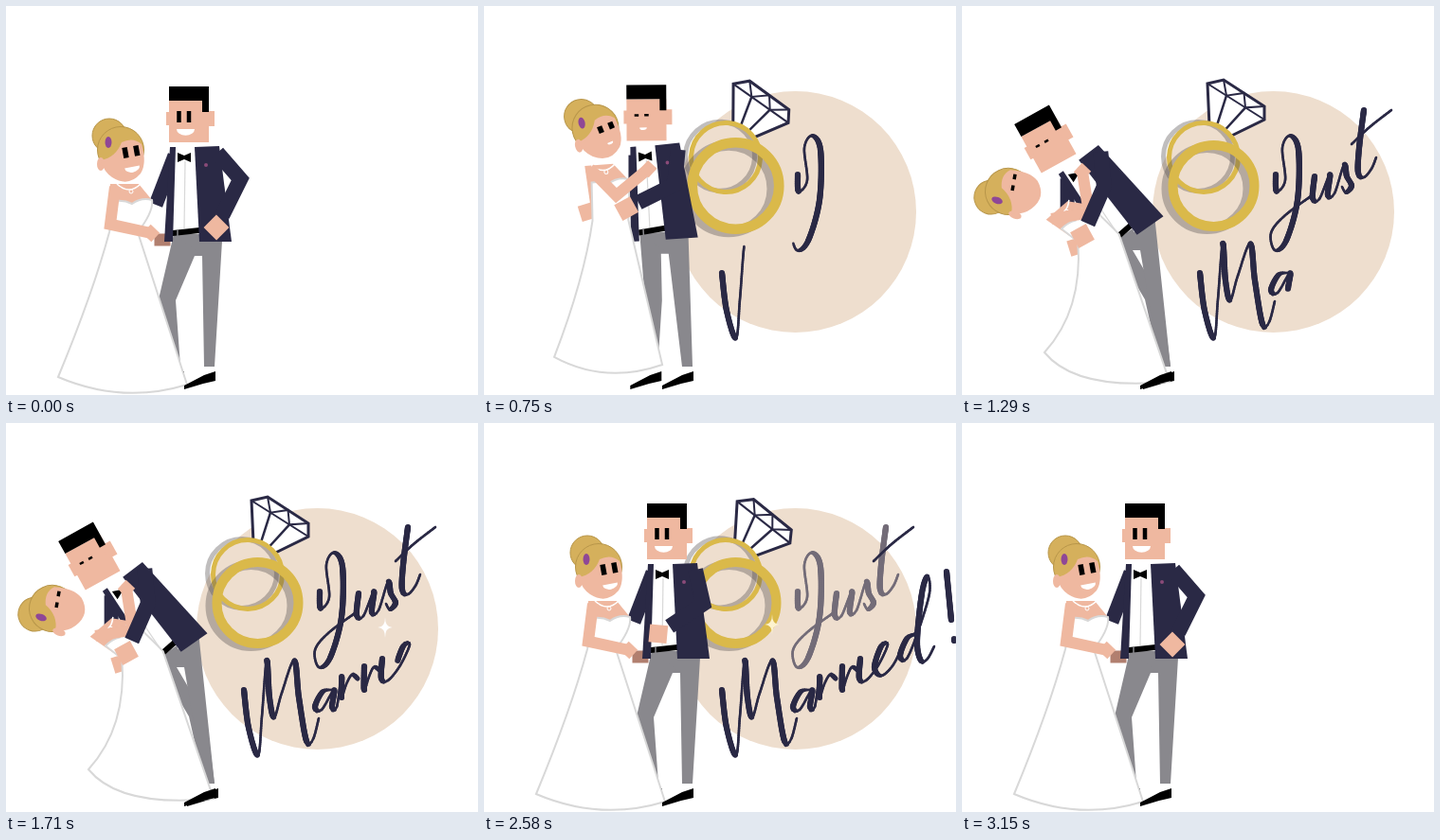
These frames come from a looping animation (498x411 px, 3210 ms). An HTML page with a canvas:

```html
<!DOCTYPE html>
<html lang="en">
<head>
<meta charset="utf-8">
<title>Just Married!</title>
<style>
html, body { margin: 0; width: 100%; height: 100%; overflow: hidden; background: #fff; }
canvas { display: block; }
</style>
</head>
<body>
<canvas id="stage" width="498" height="411"></canvas>
<script>
const c = document.getElementById('stage').getContext('2d');
const SKIN = '#efb8a0', NAVY = '#2a2945', GREY = '#89888d', HAIR = '#d5b05c', CURL = '#b8964a';
const GOLD = '#dab94a', EDGE = '#d8d8d8', CREAM = '#eedece';
const LOOP = 3210, STEP = 30;

// Timing and vectors
const clamp = x => Math.max(0, Math.min(1, x));
const span = (t, a, b) => clamp((t - a) / (b - a));
const ease = (t, a, b) => { const p = span(t, a, b); return p * p * (3 - 2 * p); };
const backOut = p => p ? 1 + 2.70158 * (p - 1) ** 3 + 1.70158 * (p - 1) ** 2 : 0;
const mix = (a, b, p) => a + (b - a) * p;
const mixAll = (a, b, p) => a.map((v, i) => mix(v, b[i], p));
const rad = deg => deg * Math.PI / 180;
const shift = ([x, y], dx, dy) => [x + dx, y + dy];

// Maps local points into a frame at (x, y) turned by angle
const frameAt = ([x, y], a) => (px, py) =>
  [x + px * Math.cos(a) - py * Math.sin(a), y + px * Math.sin(a) + py * Math.cos(a)];

// Elbow of a two-part arm; side picks the way it bends
function elbow([x, y], [hx, hy], upper, fore, side) {
  const d = Math.min(Math.hypot(hx - x, hy - y), upper + fore);
  const bend = Math.acos(Math.max(-1, Math.min(1, (upper ** 2 + d ** 2 - fore ** 2) / (2 * upper * d))));
  const a = Math.atan2(hy - y, hx - x) + side * bend;
  return [x + upper * Math.cos(a), y + upper * Math.sin(a)];
}

// The dance: hug brings them close, lift raises the bride, dip leans both over
function danceAt(t) {
  const rise = ease(t, 150, 510);
  const dip = span(t, 510, 1250) ** 2 * (1 - ease(t, 1740, 2400));
  const hug = rise * (1 - ease(t, 2220, 2580));
  const fall = dip ** 1.5;
  return {
    dip, hug, fall,
    lift: rise * (1 - ease(t, 950, 1230)),
    reach: rise * (1 - ease(t, 2200, 3000)),
    groomBlink: ease(t, 330, 690) * (1 - ease(t, 1800, 2200)),
    brideBlink: ease(t, 600, 900) * (1 - ease(t, 1900, 2500)),
    smile: 1 - span(t, 600, 850) + span(t, 1800, 2100),
    blend: (stand, hold, dipped, near = hug) => mixAll(mixAll(stand, hold, near), dipped, fall)
  };
}

// Drawing helpers
function trace(points) {
  c.beginPath();
  for (const p of points) c.lineTo(...p);
}
function poly(points, color) {
  trace(points);
  c.fillStyle = color;
  c.fill();
}
function line(points, color, width) {
  trace(points);
  c.strokeStyle = color;
  c.lineWidth = width;
  c.stroke();
}
function oval(x, y, rx, ry, color, edge) {
  c.beginPath();
  c.ellipse(x, y, rx, ry, 0, 0, 7);
  c.fillStyle = color;
  c.fill();
  if (edge) { c.strokeStyle = edge; c.lineWidth = 1; c.stroke(); }
}
function box(x, y, w, h, color) {
  c.fillStyle = color;
  c.fillRect(x - w / 2, y - h / 2, w, h);
}
function placed([x, y], angle, scale, draw) {
  c.save();
  c.translate(x, y);
  c.rotate(angle);
  c.scale(scale, scale);
  draw();
  c.restore();
}
function smile(x, y, r, tilt) {
  c.beginPath();
  c.ellipse(x, y, r, r * .72, tilt, 0, Math.PI);
  c.fillStyle = '#fff';
  c.fill();
}
const hand = (at, angle, w, h = w, color = SKIN) => placed(at, angle, 1, () => box(0, 0, w, h, color));
const shoe = x => poly([[x - 16, 401], [x + 5, 390], [x + 17, 386], [x + 17, 396], [x + 4, 399], [x - 16, 405]], '#000');

function groomRig(s) {
  const hip = s.blend([202, 249], [190, 247], [183, 243]), lean = rad(-35 * s.dip);
  return { hip, lean, torso: frameAt(hip, lean) };
}

function drawGroom(s) {
  const { hip, lean, torso } = groomRig(s);
  const shoulder = torso(-24, -91);
  line([shoulder, shift(shoulder, -20 + 20 * s.hug, 52)], NAVY, 15);
  const backHand = s.blend([165, 247], [109, 216], [121, 254]);
  if (s.hug < .3) hand(backHand, 0, 17, 13, '#b17f6f');
  else hand(backHand, -.3, 17);

  // Legs: the left one tucks behind the right in the dip
  const crotch = shift(hip, 5, 15), waist = torso(-25, -8);
  const [knee, foot] = s.blend([170, 178], [178, 176], [202, 214]);
  shoe(foot - 7);
  poly([waist, torso(2, -8), crotch, shift(crotch, -8, 0), [knee + 9, 311], [foot + 6, 381], [foot - 5, 381], [knee - 9, 310]], GREY);
  poly([waist, torso(26, -1), [220, 381], [209, 381], crotch], GREY);

  placed(hip, lean, 1, () => {
    poly([[-24, -100], [-1, -100], [2, -13], [-26, -10]], '#fff');
    line([[-13, -85], [-14, -14]], EDGE, 1.2);
    poly([[-26, -12], [2, -15], [2, -9], [-26, -6]], '#000');
    line([[-21, -13], [-21, -6]], GREY, 1.5);
    poly([[-29, -100], [-23, -100], [-26, 0], [-35, 0]], NAVY);
    poly([[-3, -100], [23, -101], [36, 0], [2, 0]], NAVY);
    poly([[-21, -94], [-14, -91], [-7, -94], [-7, -84], [-14, -87], [-21, -84]], '#000');
    oval(9, -81, 2, 2, '#8a4a78');
  });

  placed(torso(-9 - 11 * s.dip, -127 - 4 * s.dip), rad(-29 * s.dip ** 2), 1, () => {
    const eye = mix(12, 2.5, s.groomBlink);
    box(0, 0, 42, 44, SKIN);
    box(-21, -3, 6, 14, SKIN);
    box(22, -3, 10, 16, SKIN);
    poly([[-21, -37], [21, -37], [21, -10], [14, -10], [14, -22], [-21, -22]], '#000');
    for (const x of [-10.5, 0]) box(x, -5, 4.5, eye, '#000');
    smile(-3.5, 8, 9.5 * s.smile, 0);
  });
}

function drawFrontArm(s) {
  const shoulder = groomRig(s).torso(21, -94);
  const end = s.blend([222, 234], [151, 213], [127, 243], s.reach);
  const joint = elbow(shoulder, end, 37, 57, -1);
  line([shoulder, joint, mixAll(joint, end, .75)], NAVY, 16);
  hand(end, mix(.78, -.5, s.reach), 19);
}

function drawBride(s) {
  const lean = rad(-41 * s.dip), swing = 16 * Math.sin(Math.PI * s.dip);
  const neck = shift(s.blend([125, 188], [122, 189], [100, 216]), 0, -22 * s.lift);
  const chest = frameAt(neck, lean);
  const waist = frameAt(shift(s.blend([124, 239], [133, 239], [144, 245]), 0, -13 * s.lift), lean / 4);
  const half = 15 + 3.5 * s.hug + 3.5 * s.dip;
  const waistL = waist(-half, 0), waistR = waist(half, 0);
  const hemL = shift(s.blend([55, 392], [79, 393], [87, 366]), -swing, -16 * s.lift - swing);
  const hemR = shift(s.blend([191, 400], [187, 397], [219, 397]), 0, -18 * s.lift);
  const bustL = chest(-9, 18), dent = chest(8, 21), bustR = chest(29, 17);

  poly([chest(-15, 0), chest(15, 0), bustR, waistR, waistL], SKIN);
  c.beginPath();
  c.moveTo(...bustL);
  c.quadraticCurveTo(...chest(0, 17), ...dent);
  c.quadraticCurveTo(...chest(18, 14), ...bustR);
  c.quadraticCurveTo(...chest(31, 29), ...waistR);
  c.lineTo(...hemR);
  c.quadraticCurveTo(...shift(mixAll(hemL, hemR, .5), -33 * s.dip, 25), ...hemL);
  c.quadraticCurveTo(...shift(mixAll(hemL, waistL, .5), 10 + 13 * s.dip, -13 + 27 * s.dip), ...waistL);
  c.closePath();
  c.fillStyle = '#fff';
  c.fill();
  c.strokeStyle = EDGE;
  c.lineWidth = 2;
  c.stroke();

  placed(neck, lean, 1, () => {
    c.beginPath();
    c.moveTo(-8, 0);
    c.quadraticCurveTo(5, 12, 17, 0);
    c.strokeStyle = '#fff';
    c.lineWidth = 1.5;
    c.stroke();
    oval(7, 8, 2, 2, SKIN, '#fff');
  });

  const shoulder = chest(-10, 3), end = s.blend([153, 240], [175, 172], [127, 175]);
  line([shoulder, elbow(shoulder, end, 40, 44, 1), end], SKIN, 12);
  hand(end, .75, 13);

  const [x, y, tilt] = s.blend([122, 158, 0], [122, 157, -10], [55, 197, -70]);
  placed([x, y - 24 * s.lift], rad(tilt), 1, () => {
    const eye = mix(11, 3.5, s.brideBlink);
    oval(-13, -21, 18, 18, HAIR, CURL);
    oval(-1, -6, 24.5, 24.5, HAIR, CURL);
    oval(-22, 9, 4, 7, SKIN);
    c.beginPath();
    c.moveTo(-22, 5);
    c.quadraticCurveTo(-6, 2, 0, -14);
    c.quadraticCurveTo(12, -20, 21, -12);
    c.quadraticCurveTo(27, 8, 20, 19);
    c.quadraticCurveTo(7, 34, -10, 23);
    c.quadraticCurveTo(-19, 17, -22, 5);
    c.fillStyle = SKIN;
    c.fill();
    oval(-14, -14, 3.5, 6, '#8f4796');
    placed([4, -3], -.18, 1, () => {
      for (const ex of [0, 12]) box(ex, 0, 5.5, eye, '#000');
    });
    smile(11, 12, 8 * s.smile, -.2);
  });
}

// Rings
function ring(r, width, dx, dy) {
  for (const [x, y, color] of [[dx, dy, 'rgba(80,75,75,.36)'], [0, 0, GOLD]]) {
    c.beginPath();
    c.arc(x, y, r, 0, 7);
    c.strokeStyle = color;
    c.lineWidth = width;
    c.stroke();
  }
}
function gem() {
  const tip = [7, -12];
  const girdle = p => mixAll([4, -78], [64, -40], p), table = p => mixAll([21, -82], [64, -54], p);
  const outline = [tip, girdle(0), table(0), table(1), girdle(1), tip];
  poly(outline, '#fff');
  line(outline, NAVY, 3);
  line([girdle(0), girdle(1)], NAVY, 2);
  line([table(0), girdle(1 / 3), table(.5), girdle(2 / 3), table(1)], NAVY, 2);
  line([girdle(1 / 3), tip, girdle(2 / 3)], NAVY, 2.5);
}
function drawRings(t) {
  const out = 1 - ease(t, 2620, 2840);
  const turn = rad(6 * (1 - span(t, 600, 900) + span(t, 2300, 2580)));
  placed([255, 160], turn, backOut(span(t, 270, 570)) * out, () => {
    gem();
    oval(0, 0, 36, 36, CREAM);
    ring(36.5, 5, -6, -1);
  });
  placed([265.5, 190], 0, backOut(span(t, 450, 850)) * out, () => ring(43, 10, -7, 3));
}
function sparkle(x, y, r, color) {
  if (r <= 0) return;
  c.beginPath();
  c.moveTo(x, y - r);
  for (const [px, py] of [[r * .7, 0], [0, r], [-r * .7, 0], [0, -r]]) c.quadraticCurveTo(x, y, x + px, y + py);
  c.fillStyle = color;
  c.fill();
  oval(x, y, r * .25, r * .25, color);
}

// Lettering: a pen runs smoothly through a few points per stroke
function penStroke(text) {
  const p = text.split(' ').map(pair => pair.split(',').map(Number));
  const dots = [p[0]];
  for (let i = 0; i < p.length - 1; i++) {
    const [a, b, d, e] = [p[i - 1] || p[i], p[i], p[i + 1], p[i + 2] || p[i + 1]];
    const n = Math.ceil(Math.hypot(d[0] - b[0], d[1] - b[1]) / 2);
    for (let k = 1; k <= n; k++) {
      const u = k / n;
      dots.push(b.map((v, j) => v + u / 2 * (d[j] - a[j] + u * (2 * a[j] - 5 * v + 4 * d[j] - e[j] + u * (3 * (v - d[j]) + e[j] - a[j])))));
    }
  }
  return dots.slice(1).map((dot, i) => [dots[i], dot]);
}
const letters = (...strokes) => strokes.flatMap(penStroke);
const just = letters(
  '331,178 332,196 341,184 338,150 346,137 355,152 354,205 342,248 330,258 326,240 340,222 368,201',
  '372,180 370,203 377,204 388,178 386,200 393,198 403,168 406,180 411,190 405,197 401,191',
  '424,110 419,150 418,176 424,181 432,172 437,160');
const bar = letters('411,146 430,128 453,110');
const married = letters(
  '251,282 256,322 266,351 270,310 275,251 278,290 283,311 291,285 304,251 309,290 317,336 324,334 330,312',
  '345,282 334,284 326,300 333,303 346,282 344,300 349,300 354,268 354,290 359,276 365,266 371,270',
  '378,257 378,282 383,268 388,258 394,261',
  '397,249 396,270 403,272 416,256 426,234 419,236 412,258 419,267 430,258 438,244',
  '455,223 446,228 439,246 446,249 458,220 470,180 468,162 462,180 457,230 461,251 468,249 475,236');
const bang = letters('488,157 493,208', '496,228 496,230');

// Downstrokes press harder
function write(segments, p, fade = 0) {
  if (fade >= 1) return;
  c.lineCap = 'round';
  const color = `rgb(${mixAll([42, 41, 69], [238, 222, 206], fade)})`;
  for (const [a, b] of segments.slice(0, Math.round(segments.length * p))) {
    const down = Math.max(0, b[1] - a[1]) / (Math.hypot(b[0] - a[0], b[1] - a[1]) || 1);
    line([a, b], color, 2.6 + 3.6 * down);
  }
  c.lineCap = 'butt';
}
function drawText(t) {
  const out = span(t, 2640, 2840);
  write(just, span(t, 480, 1150), span(t, 2450, 2800));
  write(bar, span(t, 1150, 1240), out);
  write(married, span(t, 480, 2200), out);
  write(bang, span(t, 2230, 2400), out);
}

function draw(t) {
  c.fillStyle = '#fff';
  c.fillRect(0, 0, 498, 411);
  const r = 127.5 * backOut(span(t, 210, 630)) * (1 - ease(t, 2820, 3120));
  if (r > 0) oval(328.5, 217.5, r, r, CREAM);
  drawRings(t);
  drawText(t);
  sparkle(400, 216, 11 * Math.sin(Math.PI * span(t, 1560, 1860)), '#fff');
  sparkle(304, 213, 11 * Math.sin(Math.PI * span(t, 2430, 2730)), '#fdf3cf');
  const s = danceAt(t);
  drawGroom(s);
  drawBride(s);
  shoe(204);
  drawFrontArm(s);
}

const start = performance.now();
function frame() {
  const t = (performance.now() - start) % LOOP;
  draw(Math.floor(t / STEP) * STEP);
  requestAnimationFrame(frame);
}
frame();
</script>
</body>
</html>
```
